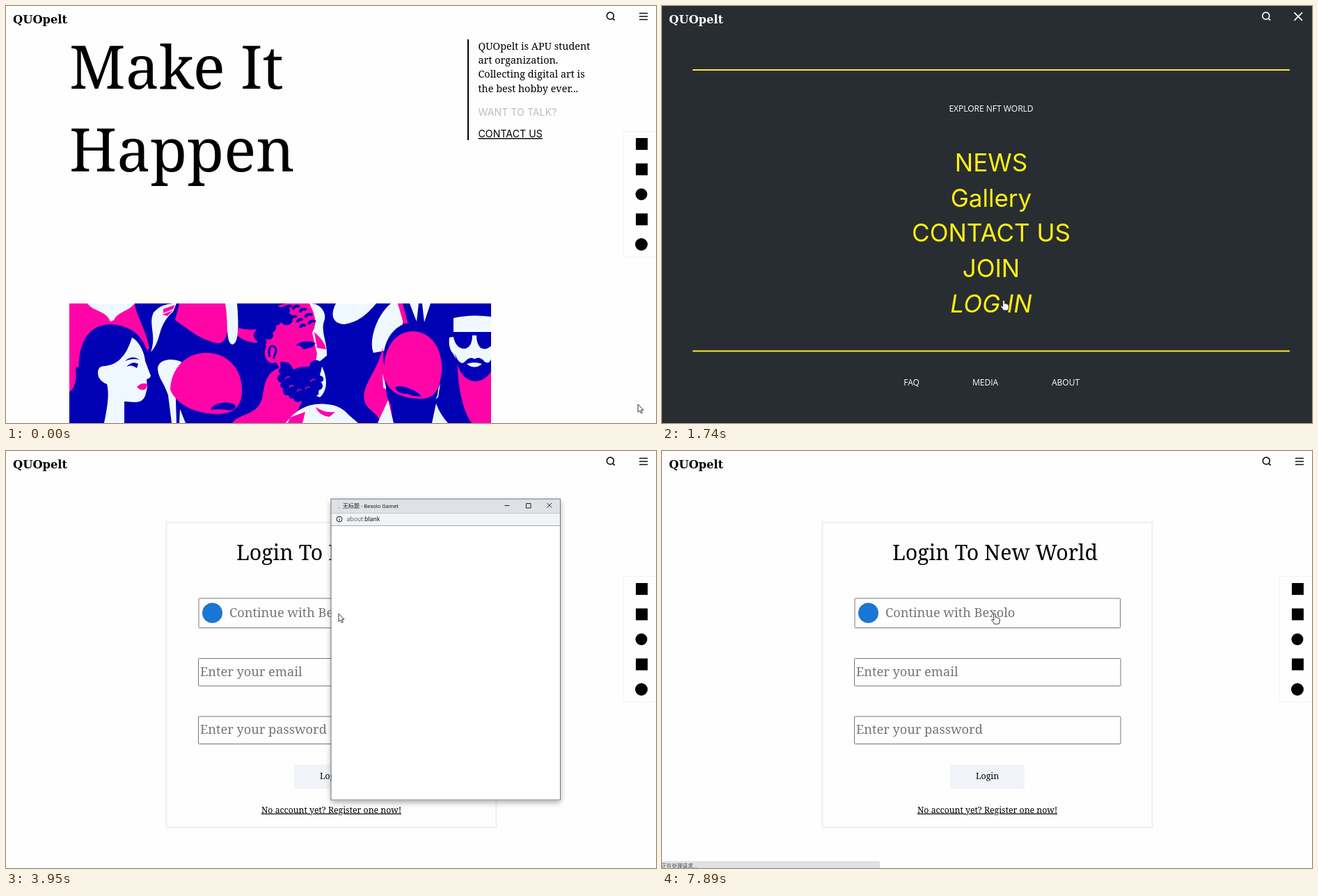
An HTML page that plays this animation: 934x600 px, repeating every 8000 ms.

```html
<!DOCTYPE html>
<html lang="en">
<head>
<meta charset="utf-8">
<title>Art site login</title>
<style>
  html, body { margin: 0; width: 100%; height: 100%; overflow: hidden; background: #fefefe; }
  svg { display: block; width: 100vw; height: 100vh; }
  text { white-space: pre; }
  .serif { font-family: "Noto Serif", serif; }
  .inter { font-family: Inter, sans-serif; }
  .open { font: 12px "Open Sans", sans-serif; fill: #fff; }
  .ui { font-family: Roboto, "Noto Sans CJK SC", "Noto Sans CJK", sans-serif; }
  .brand { font: bold 16.3px "DejaVu Serif", serif; }
  .mid { text-anchor: middle; }
  .link { text-decoration: underline; }
  .hint { font-size: 18.2px; fill: #757575; }
  .b { fill: #0000b4; } .p { fill: #ff05a8; } .w { fill: #f0f8ff; }
  .field { fill: #fefefe; stroke: #767676; }
  .thin { fill: none; stroke: #222; }
  #items text { font-size: 35px; fill: #fff212; }
</style>
</head>
<body>
<svg viewBox="0 0 934 600" xmlns="http://www.w3.org/2000/svg">
  <defs>
    <clipPath id="artClip"><rect x="91" y="428" width="606" height="172"/></clipPath>
    <clipPath id="menuClip"><rect id="menuMask" width="934" height="0"/></clipPath>
    <filter id="shadow" x="-10%" y="-10%" width="120%" height="120%">
      <feDropShadow dx="0" dy="3" stdDeviation="4" flood-opacity=".35"/>
    </filter>
  </defs>
  <rect width="934" height="600" fill="#fefefe"/>

  <g id="home">
    <g class="serif" font-size="86">
      <text x="91" y="119">Make It</text>
      <text x="91" y="238">Happen</text>
      <text x="91" y="357" id="typed"></text>
    </g>
    <rect id="caret" y="292" width="5" height="78"/>
    <g id="about">
      <rect x="663" y="48" width="2" height="145"/>
      <g class="serif" font-size="14.4">
        <text x="678.5" y="62.5">QUOpelt is APU student</text>
        <text x="678.5" y="83">art organization.</text>
        <text x="678.5" y="103">Collecting digital art is</text>
        <text x="678.5" y="123.5">the best hobby ever...</text>
      </g>
      <g class="inter" font-size="14.2">
        <text x="678.5" y="158" fill="#bdbdbd">WANT TO TALK?</text>
        <text x="678.5" y="189" class="link">CONTACT US</text>
      </g>
    </g>

    <g clip-path="url(#artClip)">
      <rect class="b" x="91" y="428" width="606" height="172"/>
      <!-- woman in profile -->
      <path class="p" d="M91 428H185C187 446 200 462 206 492L180 520H100C102 540 98 552 91 555Z"/>
      <path class="w" d="M117 428H185C175 440 160 440 155 452L150 454C144 438 126 440 117 428Z"/>
      <path class="b" d="M91 600V556C101 550 104 530 105 510C108 474 126 457 153 458C186 461 204 482 206 515L190 600Z"/>
      <path class="w" d="M181 477C191 482 199 498 200 511L208 532Q207 536 202 537L203 549 200 561Q196 571 184 570L170 569V600H141C145 580 149 560 145 544Q132 539 132 527Q132 518 142 518C163 516 174 500 181 477Z"/>
      <path class="p" d="M188 548Q195 541 203 544L202 550Q195 556 188 548Z"/>
      <path class="b" d="M171 511Q181 501 192 509Q181 506 171 511ZM173 519Q182 510 190 515L188 521Q180 515 173 519Z"/>
      <!-- raised arm and draped shapes -->
      <path class="w" d="M208 498C217 475 204 457 212 441C222 430 232 428 245 428L240 440C230 448 225 458 221 471C218 483 214 492 208 498Z"/>
      <path class="p" d="M226 436L243 430 240 436 226 442ZM224 444L240 438 232 446Z"/>
      <path class="p" d="M249 428H316C320 452 322 488 303 485C276 480 256 460 243 452Z"/>
      <path class="w" d="M315 428H332C334 450 336 487 325 487C315 484 320 455 315 428Z"/>
      <path class="p" d="M333 463Q351 468 368 464L374 484Q350 488 333 475Z"/>
      <!-- first cap -->
      <path class="w" d="M252 512C235 505 218 510 218 522C219 536 227 541 233 560L238 600H245L244 566ZM250 580L258 600H249Z"/>
      <path class="p" d="M236 552C237 520 260 499 288 499C318 499 340 522 339 555C338 578 326 587 303 587C270 587 244 572 236 552Z"/>
      <path class="b" d="M294 581C297 570 322 567 330 575Q330 581 322 582Q308 579 294 581Z"/>
      <!-- bearded figure -->
      <path class="p" d="M325 600C335 585 365 590 369 560C372 535 380 522 398 520L425 570 410 600Z"/>
      <path class="w" d="M402 600C415 582 435 570 460 573Q480 574 492 588L506 600Z"/>
      <path class="p" d="M445 577Q458 586 473 584L465 591Q450 590 445 577ZM408 592L430 584 426 600H405Z"/>
      <path class="p" d="M372 486C362 455 380 430 404 428H446L452 480 446 520 396 526Z"/>
      <path class="w" d="M436 428C452 427 462 442 457 454C452 468 462 485 461 503L450 512C462 530 464 552 451 563L438 558 447 500 440 470C448 456 444 444 436 428Z"/>
      <path class="p" d="M443 469Q458 482 460 494L447 492Z"/>
      <ellipse class="p" cx="383" cy="499" rx="11" ry="15"/>
      <path d="M379 505C374 485 389 486 388 497L384 508" fill="none" stroke="#0000b4" stroke-width="3"/>
      <path class="b" d="M416 488Q430 479 445 485L440 491 427 494Q424 488 416 488ZM437 514Q445 505 455 514L452 528 436 523Z"/>
      <path class="b" d="M394 512Q408 510 413 523Q430 515 452 522L449 559Q430 573 412 562Q396 550 394 512Z"/>
      <g id="curls"></g>
      <!-- second cap -->
      <path class="w" d="M474 428H532C522 440 508 455 486 458C468 457 466 443 474 428Z"/>
      <path class="w" d="M553 428H563C577 446 573 462 556 474L545 496 528 499C521 482 532 445 553 428ZM580 428H593L590 454ZM598 428H610L601 455Z"/>
      <path class="p" d="M563 428H570L578 458 572 460Z"/>
      <path class="p" d="M541 492C535 525 510 545 515 568C520 584 533 582 538 600H556L548 535Z"/>
      <path class="w" d="M541 529L547 552 542 549ZM624 543L621 563 614 568ZM549 567L557 600H534ZM618 572Q624 588 635 600H612Z"/>
      <path class="b" d="M542 505C545 470 566 455 587 455C610 456 627 477 626 510L620 560Q606 594 582 591Q554 585 547 560Z"/>
      <path class="p" d="M543 525C543 488 562 468 585 468C611 469 628 493 626 526C623 555 614 566 594 565C565 564 544 554 543 525Z"/>
      <path class="b" d="M559 549C566 544 589 551 597 562Q585 562 577 558Q562 559 559 549Z"/>
      <!-- man in sunglasses -->
      <path class="p" d="M648 506H697V600H669C655 580 650 550 648 506Z"/>
      <path class="w" d="M643 449Q668 443 697 447V517L673 530 646 507 643 501Q635 493 637 477L643 476Z"/>
      <path class="b" d="M642 469H697V489Q690 496 682 492Q676 486 676 474H670Q670 490 660 493Q644 494 642 469Z"/>
      <path class="b" d="M645 500Q651 517 658 513Q667 503 673 508Q681 503 688 512Q694 516 697 508V526Q688 540 673 540Q651 538 645 500Z"/>
      <path class="w" d="M662 515Q673 511 684 515Q673 524 662 515Z"/>
    </g>
  </g>

  <g id="login" class="serif">
    <rect x="230.5" y="102.5" width="474" height="439" fill="none" stroke="#f0f4f8" stroke-width="3"/>
    <text x="478.5" y="157" class="mid" font-size="30.3">Login To New World</text>
    <rect class="field" x="277" y="212" width="381.5" height="42.5" rx="1"/>
    <rect class="field" x="276.5" y="298.5" width="382.5" height="39.5" rx="1"/>
    <rect class="field" x="276.5" y="382" width="382.5" height="39.5" rx="1"/>
    <circle cx="296.5" cy="233" r="14.5" fill="#1976d2"/>
    <g class="hint">
      <text x="321" y="239">Continue with Bexolo</text>
      <text x="279" y="324">Enter your email</text>
      <text x="279" y="407">Enter your password</text>
    </g>
    <rect id="fieldCaret" x="322" y="223" width="1" height="20"/>
    <rect x="414" y="451" width="107" height="35" fill="#f0f4f8"/>
    <text x="467.5" y="472" class="mid" font-size="12.3">Login</text>
    <text x="467.5" y="520.5" class="mid link" font-size="12.3">No account yet? Register one now!</text>
  </g>

  <g id="social">
    <rect x="887.5" y="180.5" width="50" height="181" fill="#fefefe" stroke="#f4f4f4"/>
    <rect x="905" y="190" width="17" height="17"/>
    <rect x="905" y="226.5" width="17" height="17"/>
    <circle cx="913" cy="271" r="8.5"/>
    <rect x="905" y="298.5" width="17" height="17"/>
    <circle cx="913" cy="343" r="9"/>
  </g>

  <g id="menu" clip-path="url(#menuClip)">
    <rect width="934" height="600" fill="#282d31"/>
    <path d="M44 92H902M44 496.5H902" stroke="#fbea35" stroke-width="1.8"/>
    <text x="473" y="152" class="open mid">EXPLORE NFT WORLD</text>
    <g id="items" class="inter mid"></g>
    <g class="open mid">
      <text x="358.5" y="546">FAQ</text>
      <text x="464.5" y="546">MEDIA</text>
      <text x="580" y="546">ABOUT</text>
    </g>
    <rect id="menuEdge" width="934" height="2" fill="#1f2326"/>
  </g>

  <g id="header">
    <text x="10" y="24.5" class="brand" id="brand">QUOpelt</text>
    <g id="tools" fill="none" stroke-width="1.7">
      <path d="M873.3 14.2a5 5 0 1 1-10 0a5 5 0 1 1 10 0M871.8 17.8L874.7 20.7"/>
      <path id="burger" d="M910 10.5H922M910 15H922M910 19.5H922" stroke-width="1.4"/>
      <path id="cross" d="M909 9.3L920.5 20.8M920.5 9.3L909 20.8"/>
    </g>
  </g>

  <g id="popup" class="ui">
    <rect x="467.5" y="69.5" width="329" height="433" fill="#fff" filter="url(#shadow)"/>
    <rect x="467" y="69" width="330" height="20" fill="#dee1e6"/>
    <rect x="467" y="89" width="330" height="18" fill="#f1f3f4"/>
    <path d="M467 89.5H797" stroke="#c3c6ca"/>
    <path d="M467 107.5H797" stroke="#a6a9ad"/>
    <path class="thin" d="M716.5 78.5H723.5M747.5 75.5H754V82H747.5ZM777.5 75L784 81.5M784 75L777.5 81.5"/>
    <path id="spinner" fill="none" stroke="#1a73e8" stroke-width="1.6"/>
    <text id="title" x="484" y="81.5" font-size="8" fill="#222"></text>
    <text y="101.3" font-size="9.2"><tspan id="host" x="489.5"></tspan><tspan id="path"></tspan></text>
    <path id="info" class="thin" d="M483 98a4 4 0 1 1-8 0a4 4 0 1 1 8 0M479 97.5V100.5M479 95.5V96.5"/>
    <g id="lock"><rect x="476.5" y="97" width="5" height="4.5" fill="#555"/><path d="M477.5 97V95.5a1.5 1.5 0 0 1 3 0V97" fill="none" stroke="#555"/></g>
    <g id="wait">
      <path d="M467 488H574Q576 488 576 490V502H467Z" fill="#dee1e6"/>
      <text x="471" y="498" font-size="8" fill="#444">正在等待 www.bexoloapi...</text>
    </g>
    <rect x="467" y="69" width="329.5" height="433" fill="none" stroke="#74777b"/>
  </g>

  <g id="status" class="ui">
    <path id="statusBar" fill="#dee1e6"/>
    <text id="statusText" x="-1" y="600" font-size="7.6" fill="#444"></text>
  </g>

  <g id="pointer" stroke="#222" stroke-width=".9" fill="#fff" stroke-linejoin="round">
    <path id="arrow" d="M0 0V11.5L2.7 9 4.5 13 6.3 12.2 4.5 8.3H8Z"/>
    <path id="hand" d="M-1.3 1.2Q0-.9 1.3 1.2V5.2Q3 4.5 3.6 5.8Q5.2 5.2 5.6 6.5Q7 6.2 7.2 7.8V11Q6.8 13 5.8 15H-.5Q-1.5 12.5-4 10Q-4.8 8-3 8.2L-1.3 9.5Z"/>
  </g>
</svg>

<script>
const LOOP = 8000, OPEN = 780, LOGIN = 2040, POPUP = 3500, CLOSED = 7290, REPLY = 7650;
const BLUE = "#0000b4", PINK = "#ff05a8";
const HEADLINE = "Shock Everyone";
const HOST = "quopelt-32191.firebaseapp.com";
// label and half its width
const ITEMS = [["NEWS", 52], ["Gallery", 59], ["CONTACT US", 117], ["JOIN", 41], ["LOG IN", 61]];
// time, x, y of the pointer tip
const TRACK = [
  [0, 908, 573], [50, 908, 573], [720, 914, 14], [1000, 914, 14], [1720, 491, 423],
  [2060, 491, 423], [2800, 478, 237], [2860, 478, 237], [3040, 478, 234], [LOOP, 478, 234]
];

const $ = id => document.getElementById(id);
const clamp = v => Math.max(0, Math.min(1, v));
const span = (t, a, b) => clamp((t - a) / (b - a));
const ease = p => p * p * (3 - 2 * p);
const show = (id, on) => $(id).style.display = on ? "" : "none";
const set = (id, name, value) => $(id).setAttribute(name, value);
const put = (id, value) => { if ($(id).textContent !== value) $(id).textContent = value; };

function add(parent, tag, attrs, text = "") {
  const el = document.createElementNS("http://www.w3.org/2000/svg", tag);
  for (const key in attrs) el.setAttribute(key, attrs[key]);
  el.textContent = text;
  return $(parent).appendChild(el);
}

const itemY = i => 238 + i * 50.7;
const labels = ITEMS.map(([name], i) => add("items", "text", { x: 473, y: itemY(i) }, name));

function alongArc(cx, cy, rx, ry, from, to, n, place) {
  for (let i = 0; i < n; i++) {
    const a = (from + (to - from) * i / (n - 1)) * Math.PI / 180;
    place(cx + rx * Math.cos(a), cy + ry * Math.sin(a), i);
  }
}
const lock = r => (cx, cy, i) => add("curls", "circle", { cx, cy, r: r * (0.85 + 0.3 * (i % 2)), fill: BLUE });
const swirl = (r, stroke, width) => (x, y) => add("curls", "path", {
  d: `M${x - r} ${y}a${r} ${r} 0 0 1 ${r * 1.6} ${-r * 0.6}`, fill: "none", stroke, "stroke-width": width
});
alongArc(407, 472, 42, 34, 160, 262, 7, lock(8));
alongArc(401, 470, 24, 20, 170, 275, 4, lock(8));
alongArc(412, 466, 30, 30, 240, 345, 6, swirl(6, BLUE, 4));
alongArc(410, 466, 18, 16, 220, 350, 5, swirl(5, BLUE, 4));
alongArc(424, 531, 28, 33, 10, 190, 11, lock(5.5));
alongArc(424, 533, 19, 22, 20, 170, 5, swirl(4, PINK, 1.4));

function pointerAt(t) {
  const i = TRACK.findIndex(k => k[0] > t);
  const a = TRACK[i - 1], b = TRACK[i], p = ease(span(t, a[0], b[0]));
  return [a[1] + (b[1] - a[1]) * p, a[2] + (b[2] - a[2]) * p];
}

function drawHome(t, menuOpen) {
  put("typed", HEADLINE.slice(0, Math.floor((t + 20) / 87)));
  show("caret", t >= 60);
  set("caret", "x", 91 + $("typed").getComputedTextLength() + 12);
  set("home", "transform", `translate(${menuOpen ? 1 : 0})`);
  set("about", "transform", `translate(${menuOpen ? 9 : 0})`);
}

function drawMenu(t, x, y) {
  const h = 600 * ease(span(t, OPEN, 1250));
  set("menuMask", "height", h);
  set("menuEdge", "y", h < 600 ? h - 2 : 600);
  let over = false;
  labels.forEach((el, i) => {
    const on = h > itemY(i) && Math.abs(x - 473) < ITEMS[i][1] && Math.abs(y - itemY(i) + 13) < 25;
    el.setAttribute("font-style", on ? "italic" : "normal");
    over = over || on;
  });
  return over;
}

function drawSpinner(t) {
  const dt = t - 3950;
  const sweep = (12 + 250 * (0.5 - 0.5 * Math.cos(2 * Math.PI * dt / 1060))) * Math.PI / 180;
  const a = (45 + dt * 0.2107) * Math.PI / 180;
  const at = q => `${475.5 + 4.2 * Math.cos(q)} ${78.5 + 4.2 * Math.sin(q)}`;
  set("spinner", "d", `M${at(a)}A4.2 4.2 0 ${sweep > Math.PI ? 1 : 0} 1 ${at(a + sweep)}`);
  show("spinner", t >= 3900 && t < 6490);
}

function drawPopup(t) {
  const p = ease(span(t, POPUP, 3700)) * (1 - ease(span(t, 7130, CLOSED)));
  const s = 0.92 + 0.08 * p, loaded = t >= 4890;
  show("popup", p > 0);
  set("popup", "opacity", p);
  set("popup", "transform", `translate(632 286) scale(${s}) translate(-632 -286)`);
  put("title", loaded ? `https://${HOST}/__/auth/handler?a...` : "无标题 - Bexolo Garnet");
  put("host", loaded ? HOST : "about:");
  put("path", loaded ? "/__/auth/handler?apiKey=AIzaSyAf..." : "blank");
  set("host", "fill", loaded ? "#222" : "#6b6f74");
  set("path", "fill", loaded ? "#6b6f74" : "#222");
  show("info", !loaded);
  show("lock", loaded);
  show("wait", t >= 5250);
  drawSpinner(t);
}

function drawStatus(t) {
  const w = t < 7710 ? 160 : 313;
  show("status", t >= REPLY);
  set("statusBar", "d", `M0 590H${w - 2}Q${w} 590 ${w} 592V600H0Z`);
  put("statusText", t < 7890 ? `正在等待 ${HOST}...` : "正在处理请求...");
}

function draw(t) {
  const [x, y] = pointerAt(t);
  const inLogin = t >= LOGIN, menuOpen = t >= OPEN && !inLogin;
  const onCross = Math.hypot(x - 914, y - 14) < 14;
  const ready = !inLogin || t >= 2100;

  show("home", !inLogin);
  show("login", inLogin);
  show("menu", menuOpen);
  if (!inLogin) drawHome(t, menuOpen);
  const overItem = drawMenu(t, x, y) && menuOpen;

  show("social", ready && !menuOpen);
  show("tools", ready);
  show("burger", !menuOpen);
  show("cross", menuOpen);
  set("brand", "fill", menuOpen ? "#fff" : "#000");
  set("tools", "stroke", menuOpen ? "#fff" : "#111");
  set("tools", "transform", `translate(${menuOpen ? -0.5 : 0})`);
  set("cross", "stroke", onCross ? "#777" : "#fff");

  show("fieldCaret", t >= 3220 && t < POPUP);
  drawPopup(t);
  drawStatus(t);

  const overField = inLogin && y < 254 && (t < POPUP || t >= REPLY);
  const hand = (onCross && !inLogin) || overItem || overField || (inLogin && t < 2100);
  set("pointer", "transform", `translate(${x} ${y})`);
  show("hand", hand);
  show("arrow", !hand);
}

const start = performance.now();
function tick() {
  draw((performance.now() - start) % LOOP);
  requestAnimationFrame(tick);
}
tick();
</script>
</body>
</html>
```
